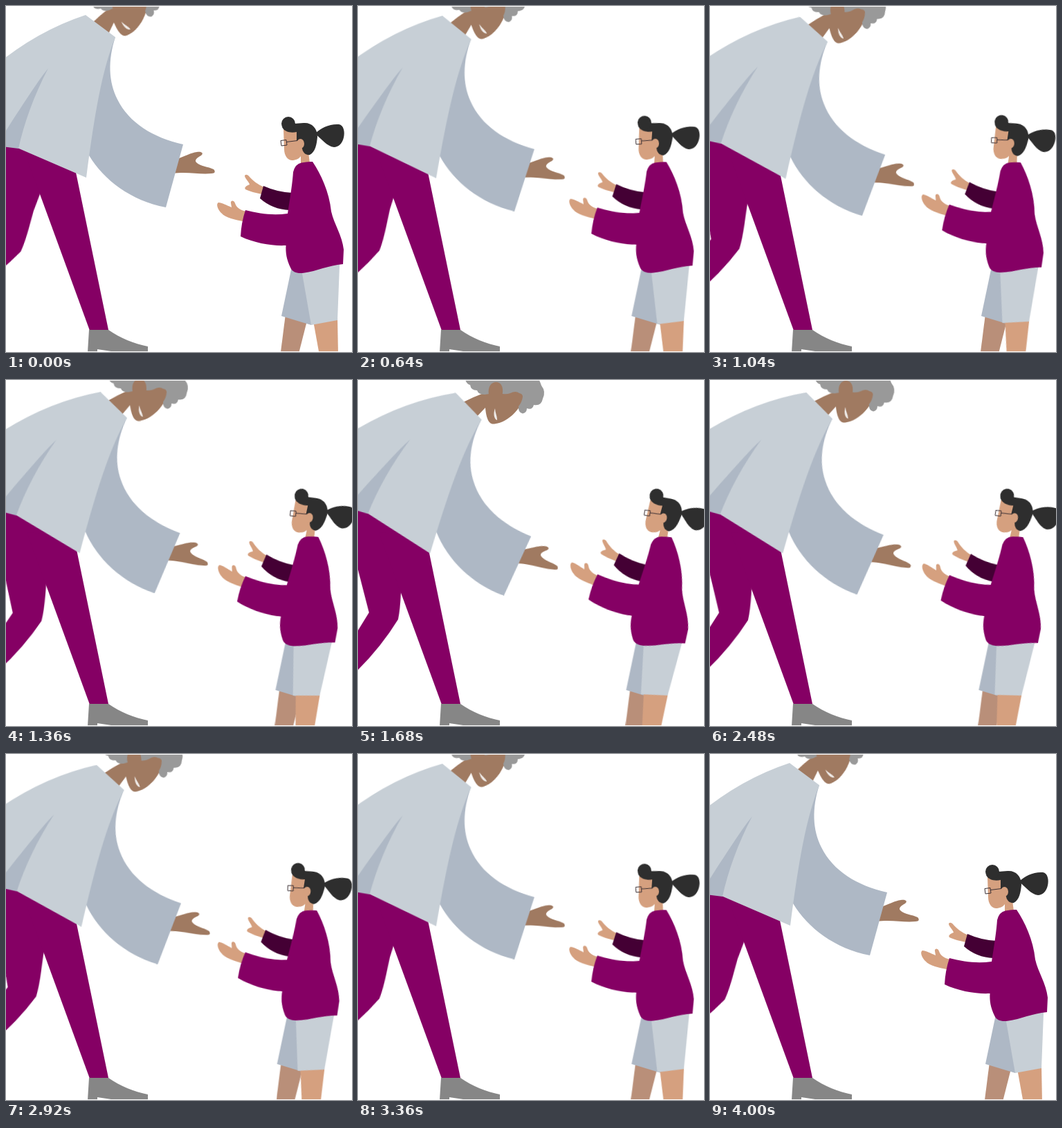
An HTML page for the animation above (4.04 s loop, 500 px wide and 500 px high).

```html
<!DOCTYPE html>
<html lang="en">
<head>
<meta charset="utf-8">
<title>Open arms</title>
<style>
  html, body { margin: 0; width: 100%; height: 100%; overflow: hidden; background: #fff; }
  svg { display: block; width: 100vw; height: 100vh; clip-path: inset(1px 0); }

  .purple { fill: #850064; }
  .plum   { fill: #440034; }
  .light  { fill: #c7cfd6; }
  .shade  { fill: #aeb8c5; }
  .brown  { fill: #a07a61; }
  .tan    { fill: #d5a07f; }
  .tan-dk { fill: #b98f79; }
  .grey   { fill: #999; }
  .shoe   { fill: #868686; }
  .dark   { fill: #2e2e2e; }
  .teeth  { fill: #efebe8; }
  .frame  { fill: none; stroke: #3a2f33; stroke-width: 1; }

  /* Every joint swings from --a to --b and back about its own origin. */
  .joint { animation: sway 4040ms cubic-bezier(.333, 0, .667, 1) infinite; }
  @keyframes sway {
    0%, 99.01%, 100% { transform: rotate(var(--a, 0deg)); }
    49.505% { transform: translateX(var(--x, 0px)) rotate(var(--b, 0deg)); }
  }
  .adult-leg   { --a: 12.8deg;  --b: -.9deg;  transform-origin: 0 187px; }
  .adult-head  { --a: -17.7deg; --b: 1.3deg;  transform-origin: 118px 122px; }
  .adult-mouth { --a: -22deg;   --b: 1.6deg;  transform-origin: 199px 50px; }
  .adult-torso { --b: 10deg; transform-origin: 94px 177px; }
  .child-rear  { --x: -11.3px; }
  .child-leg   { --b: 14deg; transform-origin: 455px 317px; }
  .child-head  { --b: 16deg; transform-origin: 431px 258px; }
  .child-torso { --b: 10deg; transform-origin: 433px 289px; }
</style>
</head>
<body>
<svg viewBox="0 0 500 500">
  <!-- Adult -->
  <path class="joint adult-leg purple" d="M-40 150 L72 190 L66.6 259 L63 285 L62 308 Q61 332 58 346 Q34 385 0 419 L-60 479 L-70 440 L0 362 L16 336 L0 274 L-25 190 Z"/>
  <path class="purple" d="M121 469 H148.200 L98 226 L30 220 Z"/>
  <path class="shoe" d="M120 468 H148 C165 480 185 488 205 492 V499 H152 L132 496 V500 H118 Z"/>

  <g class="joint adult-head">
    <path class="brown" d="M145 48 L152 32 Q168 24 184 18 L200 10 L239 14 V24 C238 38 219 61 197 63.500 C188 65 185 52 184 40 L165 60 Z"/>
    <path class="grey" d="M148 -12 L155 0 Q158 7 162 7 Q163 15 172 15 Q174 21 183 21 L190 20 H209 Q215 21 220 19 Q228 15 233 19 Q238 20 238 24 Q237 32 232 38 Q231 47 238 48.500 Q244 47 244 41 Q252 44 254 36 Q265 38 267 27 Q272 17 265 8 Q263 1 255 -12 Z"/>
    <path class="brown" d="M189 22 C187 9 193 3 199.500 3 C206 3 211 9 208.500 22 Z"/>
    <path class="joint adult-mouth teeth" d="M198 41 C195.500 48 196 56 201 58 C201.500 53 198 47 198 41 Z"/>
  </g>

  <g class="joint adult-torso">
    <path class="brown" d="M244 222 C260 217 267 212 276 211 C283 210 286 213 282 216 C276 219 272 223 275 226 C281 232 292 232 300 236 C303 239 302 242 297 242 C280 244 264 239 240 242 Z"/>
    <path class="shade" d="M158 45 C147 78 148 110 161 135 C178 169 212 190 256 200 L231 291 C180 281 142 252 120 216 L100 120 L150 50 Z"/>
    <path class="light" d="M-40 108 L-16 86.600 Q45 36 115 13 L158 45 C139 92 128 155 116 248 L-60 172 Z"/>
    <path class="shade" d="M61 90 C44 111 18 152 -14 202 L18 206 C26 170 40 130 61 90 Z"/>
  </g>

  <!-- Child -->
  <g class="joint child-rear">
    <path class="tan-dk" d="M404 445 L397 500 V510 H421 L435 455 Z"/>
    <path class="shade" d="M415 367 L398 448 L441 461 L445 370 Z"/>
  </g>
  <g class="joint child-leg">
    <path class="tan" d="M444 455 L463 560 H481 L479 450 Z"/>
    <path class="light" d="M426 375 L441 461 L479 454 L482.500 362 Z"/>
  </g>

  <g class="joint child-head">
    <path class="tan" d="M401 178 L402 207 C402 218 409 224 415 223 C421 222 424 220 426 217 V234 H440 L437 212 L430 180 Z"/>
    <path class="dark" d="M447 184 C455 176 468 170 481 171 C488 172 490 182 488 190 C486 199 480 204 474 204 C464 203 456 192 447 185 Z"/>
    <path class="dark" d="M399 175 C402 182 412 184 420 182 V194 L428 206 C429 213 435 216 439 215 C447 211 449 200 450 189 C450 176 441 168 430 169 L417 170 Z"/>
    <circle class="dark" cx="408" cy="170" r="10"/>
    <ellipse class="tan" cx="425.500" cy="199" rx="5.500" ry="7"/>
    <path class="frame" d="M397 194.500 L405 193.500 L406 201 L398 202 Z M405.300 196.500 L421 194.500"/>
  </g>

  <g class="joint child-torso">
    <path class="tan" d="M374 262 C363 258 357 252 352 247 C349 243 345 243 345 246 C346 250 351 254 352 258 C347 260 344 262 346 265 C352 268 361 270 370 272 Z"/>
    <path class="plum" d="M372 260 Q392 269 414 270 L410 295 Q385 294 367 278 Z"/>
    <path class="tan" d="M348 297 C338 295 333 291 331 285 C329 280 324 281 325 285 L326 291 C319 288 312 284 307 284 C303 286 306 294 311 299 C318 307 330 308 345 312 Z"/>
    <path class="purple" d="M427 226.500 Q436 224.500 443 225 C455 243 467 268 470 297 C474 315 486 332 488 352 L487 373 C465 375 450 383 430 385.800 C420 387 414 384 411.500 379 C405 366 404 356 404.500 346 C385 347 360 343 339 333 Q340 313 346 295 C366 300 385 303 407 300 C411 275 414 255 415 240 Q418 228 427 226.500 Z"/>
  </g>
</svg>
</body>
</html>
```
